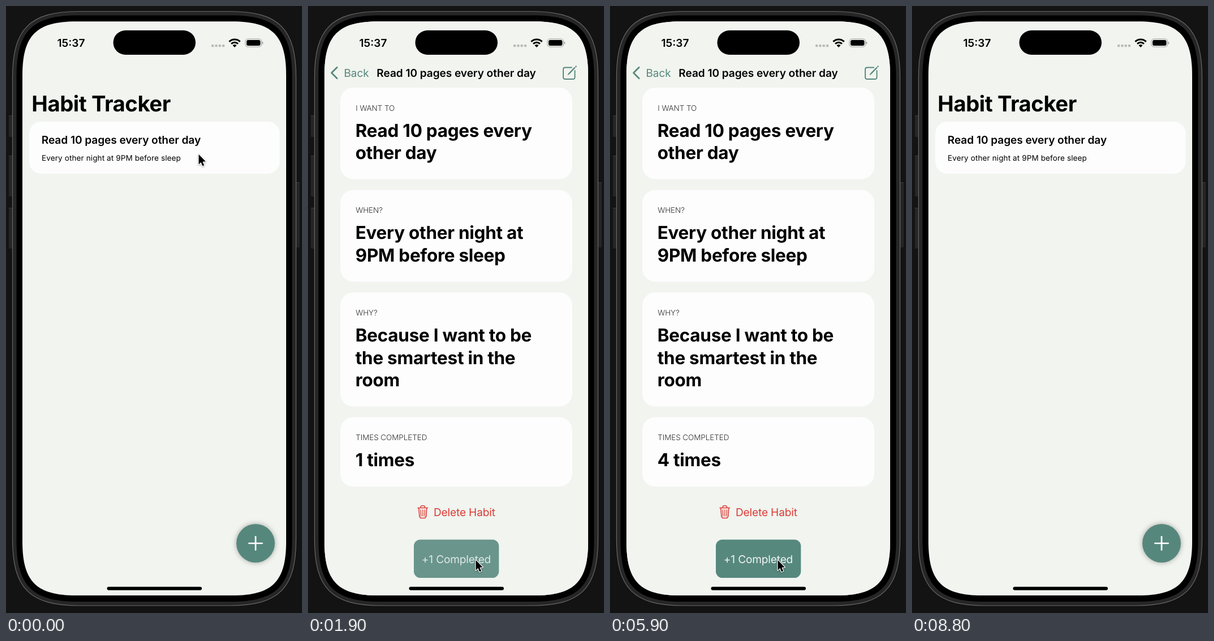
Recreate the animation shown at these times as an HTML page with a canvas. Size 523x1071 px, loop 9.6 s.

```html
<!DOCTYPE html>
<html lang="en">
<head>
<meta charset="utf-8">
<title>Habit Tracker</title>
<style>
html, body { margin: 0; width: 100%; height: 100%; overflow: hidden; background: #131313; }
canvas { display: block; width: 523px; height: 1071px; }
</style>
</head>
<body>
<canvas id="stage"></canvas>
<script>
const W = 523, H = 1071, LOOP = 9600, STEP = 100;
const BG = '#f1f4ef', CARD = '#fdfdfd', TEAL = '#56877d', RED = '#dc3a34';
const SCREEN = { x: 29, y: 27.3, w: 466, h: 1012.7 };
const PUSH_AT = 80, POP_AT = 7469.6;
const CLICKS = [1750, 3000, 4300, 5550];

const canvas = document.getElementById('stage');
const ctx = canvas.getContext('2d');
const dpr = window.devicePixelRatio || 1;
canvas.width = Math.round(W * dpr);
canvas.height = Math.round(H * dpr);

// weight, size, tracking
const STYLES = {
  large: [700, 38.2, -0.4],
  title: [700, 31.5, -0.27],
  head: [600, 19.1, -0.06],
  clock: [600, 19.1, 0],
  body: [400, 19.1, -0.16],
  small: [400, 13.5, 0.12],
  label: [300, 13.5, -0.08]
};

const clamp = (v, a = 0, b = 1) => Math.min(b, Math.max(a, v));
const mix = (a, b, k) => a + (b - a) * k;
const ease = k => k * k * (3 - 2 * k);

// Critically damped spring from 0 to 1
function spring(ms, omega) {
  const x = Math.max(0, ms) / 1000 * omega;
  return 1 - (1 + x) * Math.exp(-x);
}

function text(str, x, y, style, color = '#000', align = 'left') {
  const [weight, size, tracking] = STYLES[style];
  ctx.font = `${weight} ${size}px Inter, "Open Sans", sans-serif`;
  ctx.letterSpacing = tracking + 'px';
  ctx.textAlign = align;
  ctx.fillStyle = color;
  ctx.fillText(str, x, y);
}

function box(x, y, w, h, r, color) {
  ctx.beginPath();
  ctx.roundRect(x, y, w, h, r);
  ctx.fillStyle = color;
  ctx.fill();
}

function line(points, color, width) {
  ctx.beginPath();
  points.forEach(([x, y], i) => i ? ctx.lineTo(x, y) : ctx.moveTo(x, y));
  ctx.strokeStyle = color;
  ctx.lineWidth = width;
  ctx.stroke();
}

// Rounded rectangle with continuous corners
function smoothRect(x, y, w, h, r) {
  const e = r * 1.32, c = e * 0.258, R = x + w, B = y + h;
  ctx.beginPath();
  ctx.moveTo(x + e, y);
  ctx.lineTo(R - e, y);
  ctx.bezierCurveTo(R - c, y, R, y + c, R, y + e);
  ctx.lineTo(R, B - e);
  ctx.bezierCurveTo(R, B - c, R - c, B, R - e, B);
  ctx.lineTo(x + e, B);
  ctx.bezierCurveTo(x + c, B, x, B - c, x, B - e);
  ctx.lineTo(x, y + e);
  ctx.bezierCurveTo(x, y + c, x + c, y, x + e, y);
  ctx.closePath();
}

function faded(alpha, draw) {
  if (alpha <= 0) return;
  ctx.save();
  ctx.globalAlpha *= alpha;
  draw();
  ctx.restore();
}

function drawPhone() {
  ctx.fillStyle = '#131313';
  ctx.fillRect(0, 0, W, H);
  for (const [x, y, h] of [[5, 193, 38], [5, 264, 72], [5, 356, 72], [512, 311, 115]]) {
    box(x, y, 7, h, 1.5, '#252525');
    box(x, y, 7, 1, 0, '#3c3c3c');
  }
  smoothRect(11.5, 9.5, 501, 1048.5, 89);
  ctx.fillStyle = '#262626';
  ctx.fill();
  ctx.strokeStyle = '#686868';
  ctx.lineWidth = 1.2;
  ctx.stroke();
  smoothRect(18.5, 16.5, 487, 1034.5, 82);
  ctx.fillStyle = '#000';
  ctx.fill();
}

function drawStatus() {
  text('15:37', 115, 71.9, 'clock', '#000', 'center');
  box(189.5, 43, 145.5, 43, 21.5, '#000');
  for (let i = 0; i < 4; i++) box(363 + i * 6.3, 68, 4.2, 4.2, 1, '#b9bbb7');

  const from = -Math.PI / 2 - 0.76, to = -Math.PI / 2 + 0.76;
  ctx.beginPath();
  ctx.moveTo(404, 73);
  ctx.arc(404, 73, 5, from, to);
  ctx.fillStyle = '#000';
  ctx.fill();
  ctx.lineCap = 'butt';
  for (const r of [8.7, 14]) {
    ctx.beginPath();
    ctx.arc(404, 73, r, from, to);
    ctx.strokeStyle = '#000';
    ctx.lineWidth = 2.9;
    ctx.stroke();
  }

  ctx.beginPath();
  ctx.roundRect(423, 58, 28.5, 14, 4.6);
  ctx.strokeStyle = '#9c9e9a';
  ctx.lineWidth = 1.1;
  ctx.stroke();
  box(425, 60, 24.5, 10, 3, '#000');
  box(452.6, 63, 1.6, 4.4, 0.8, '#9c9e9a');
}

function drawList() {
  ctx.fillStyle = BG;
  ctx.fillRect(SCREEN.x, 0, SCREEN.w, H);
  box(41, 204, 442.5, 92, 21, CARD);
  text('Read 10 pages every other day', 62.8, 243.2, 'head');
  text('Every other night at 9PM before sleep', 63, 272.5, 'small');

  ctx.save();
  ctx.shadowColor = 'rgba(0,0,0,.34)';
  ctx.shadowBlur = 10 * dpr;
  ctx.beginPath();
  ctx.arc(441, 948, 34, 0, 7);
  ctx.fillStyle = TEAL;
  ctx.fill();
  ctx.restore();
  ctx.lineCap = 'round';
  line([[429.3, 948], [452.7, 948]], '#fff', 2.7);
  line([[441, 936.3], [441, 959.7]], '#fff', 2.7);
}

function drawCard(y, h, label, lines) {
  box(57, y, 410, h, 23, CARD);
  text(label, 84.2, y + 40.9, 'label', '#303030');
  lines.forEach((s, i) => text(s, 83.7, y + 86.8 + i * 39.5, 'title'));
}

function drawTrash() {
  ctx.lineCap = ctx.lineJoin = 'round';
  line([[194, 885.5], [211.6, 885.5]], RED, 1.6);
  line([[195.8, 886], [197, 901], [199, 903.5], [206.6, 903.5], [208.6, 901], [209.8, 886]], RED, 1.6);
  line([[199.2, 885], [199.2, 883], [200.6, 881.8], [205, 881.8], [206.4, 883], [206.4, 885]], RED, 1.5);
  for (const k of [-1, 0, 1]) {
    line([[202.8 + k * 3.6, 889], [202.8 + k * 3.1, 900]], RED, 1.3);
  }
}

function pressAlpha(t) {
  let dip = 0;
  for (const c of CLICKS) {
    const d = t - c;
    if (d > 0) dip = Math.max(dip, 0.15 * clamp(d / 60) * (1 - ease(clamp((d - 80) / 330))));
  }
  return 1 - dip;
}

function drawDetail(t) {
  const count = CLICKS.filter(c => t >= c).length;
  ctx.fillStyle = BG;
  ctx.fillRect(SCREEN.x, 0, SCREEN.w + 1, H);
  drawCard(144, 161.5, 'I WANT TO', ['Read 10 pages every', 'other day']);
  drawCard(324.5, 162, 'WHEN?', ['Every other night at', '9PM before sleep']);
  drawCard(505.3, 201.5, 'WHY?', ['Because I want to be', 'the smartest in the', 'room']);
  drawCard(725.5, 122.5, 'TIMES COMPLETED', [count + ' times']);
  drawTrash();
  text('Delete Habit', 222, 900.1, 'body', RED);
  faded(pressAlpha(t), () => {
    box(187, 941.5, 150.3, 67.5, 11.5, TEAL);
    text('+1 Completed', 262, 982.5, 'body', '#f4f7f4', 'center');
  });
}

function drawEditIcon() {
  ctx.lineCap = ctx.lineJoin = 'round';
  ctx.strokeStyle = TEAL;
  ctx.lineWidth = 1.9;
  ctx.beginPath();
  ctx.moveTo(466, 108.5);
  ctx.lineTo(454.5, 108.5);
  ctx.quadraticCurveTo(451, 108.5, 451, 112);
  ctx.lineTo(451, 125.5);
  ctx.quadraticCurveTo(451, 129, 454.5, 129);
  ctx.lineTo(468, 129);
  ctx.quadraticCurveTo(471.5, 129, 471.5, 125.5);
  ctx.lineTo(471.5, 114);
  ctx.stroke();
  line([[461, 119.5], [471.2, 109]], TEAL, 2.4);
  line([[473.3, 106.8], [473.6, 106.5]], TEAL, 2.4);
  line([[459.3, 121.2], [460.6, 120]], TEAL, 1.3);
}

// p: 0 = detail shown, 1 = list shown
function drawNav(p, popping) {
  faded(1 - p * 9, () => {
    ctx.lineCap = ctx.lineJoin = 'round';
    line([[51.3, 108.3], [41.6, 118], [51.3, 127.7]], TEAL, 2.7);
  });
  faded(1 - p * 6.2, () => {
    ctx.translate(63.5, 125.1 + p * 40);
    ctx.scale(1 + p * 0.8, 1 + p * 0.8);
    text('Back', 0, 0, 'body', popping ? '#777' : TEAL);
  });
  faded(1 - p, () => {
    text('Read 10 pages every other day', 262 + p * 206, 125.1, 'head', '#000', 'center');
  });
  faded(1 - p * p * 1.02, drawEditIcon);
  faded(clamp((p - 0.2) / 0.6), () => {
    const k = ease(p), s = mix(0.5, 1, k);
    ctx.translate(mix(63, 45.3, k), mix(130, 185.8, k));
    ctx.scale(s, s);
    text('Habit Tracker', 0, 0, 'large');
  });
}

// time, x, y of the pointer tip
const PATH = [
  [0, 340, 261], [100, 340, 261], [480, 340, 294], [650, 340, 294], [1550, 296, 977],
  [6050, 296, 977], [6950, 89, 109], [8000, 89, 109], [8600, 93, 36]
];

function drawCursor(t) {
  if (t >= 8700) return;
  let i = 0;
  while (i < PATH.length - 2 && t >= PATH[i + 1][0]) i++;
  const a = PATH[i], b = PATH[i + 1];
  const k = ease(clamp((t - a[0]) / (b[0] - a[0])));
  ctx.save();
  ctx.translate(mix(a[1], b[1], k), mix(a[2], b[2], k));
  ctx.beginPath();
  for (const [x, y] of [[0, 0], [0, 17.6], [4, 14], [6.7, 20.4], [9.6, 19.2], [6.9, 12.9], [12.2, 12.4]]) {
    ctx.lineTo(x + 0.5, y + 0.8);
  }
  ctx.closePath();
  ctx.lineJoin = 'round';
  ctx.shadowColor = 'rgba(0,0,0,.35)';
  ctx.shadowBlur = 3 * dpr;
  ctx.shadowOffsetY = dpr;
  ctx.strokeStyle = '#fff';
  ctx.lineWidth = 2.4;
  ctx.stroke();
  ctx.shadowColor = 'transparent';
  ctx.fillStyle = '#000';
  ctx.fill();
  ctx.restore();
}

function draw(t) {
  const popping = t >= POP_AT;
  const p = popping ? spring(t - POP_AT, 20.5) : 1 - spring(t - PUSH_AT, 20.5);
  ctx.setTransform(dpr, 0, 0, dpr, 0, 0);
  ctx.textRendering = 'geometricPrecision';
  drawPhone();

  ctx.save();
  smoothRect(SCREEN.x, SCREEN.y, SCREEN.w, SCREEN.h, 72);
  ctx.clip();

  ctx.save();
  ctx.translate(-0.3 * SCREEN.w * (1 - p), 0);
  drawList();
  ctx.restore();
  ctx.fillStyle = BG;
  ctx.fillRect(SCREEN.x + SCREEN.w - 0.3 * SCREEN.w * (1 - p), 0, SCREEN.w, H);
  ctx.fillStyle = `rgba(0,0,0,${0.115 * (1 - p)})`;
  ctx.fillRect(0, 0, W, H);

  if (p < 0.999) {
    ctx.save();
    ctx.translate(SCREEN.w * p, 0);
    drawDetail(t);
    ctx.restore();
  }
  drawNav(p, popping);
  drawStatus();
  box(178.5, 1024.7, 167.5, 6, 3, '#000');
  ctx.restore();

  drawCursor(t);
}

const start = performance.now();
function tick() {
  const t = (performance.now() - start) % LOOP;
  draw(Math.floor((t + 1) / STEP) * STEP % LOOP);
  requestAnimationFrame(tick);
}
tick();
</script>
</body>
</html>
```
